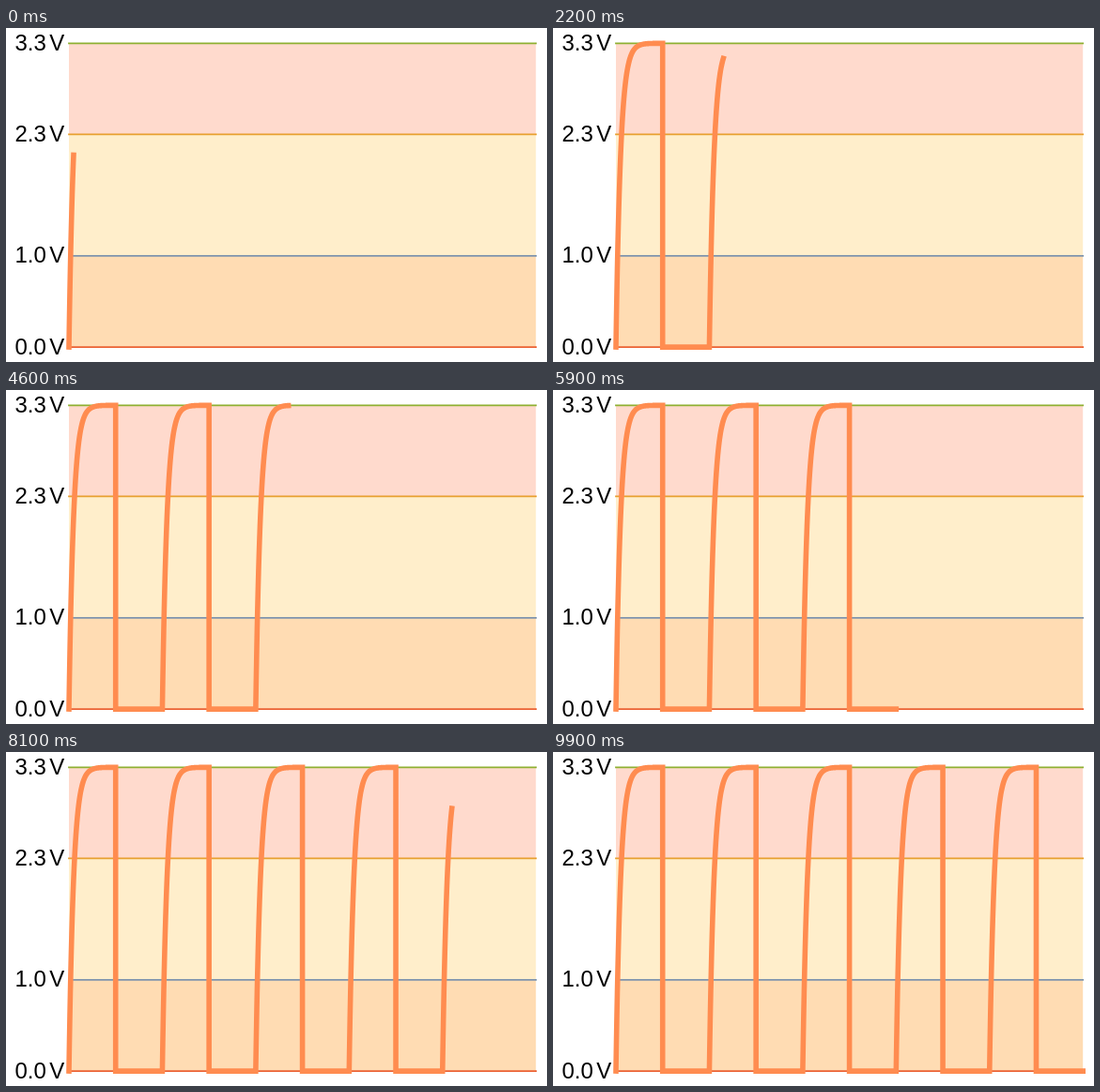
An HTML page with a canvas that plays this animation: 576 by 356 pixels, repeating every 10 s.

```html
<!DOCTYPE html>
<html lang="en">
<head>
<meta charset="utf-8">
<title>Charging pulses</title>
<style>
html, body { margin: 0; width: 576px; height: 356px; overflow: hidden; background: #fff; }
canvas { display: block; }
</style>
</head>
<body>
<canvas id="stage" width="576" height="356"></canvas>
<script>
const ctx = document.getElementById('stage').getContext('2d');
const LEFT = 67, RIGHT = 564.2, BOTTOM = 340.1, HEIGHT = 323.8;
const STEP_MS = 100, STEPS = 100, HALF = 10;

// time in time constants, level as a fraction of the supply voltage
const px = t => LEFT + (RIGHT - LEFT) * t / STEPS;
const py = v => BOTTOM - HEIGHT * v;

const levels = [
  { v: 0, label: '0.0', color: '#eb6235', fill: '#ffdcb3' },
  { v: 0.3, label: '1.0', color: '#7f95ae', fill: '#ffeecb' },
  { v: 0.7, label: '2.3', color: '#e8a030', fill: '#ffdacd' },
  { v: 1, label: '3.3', color: '#8fb032' }
];

function drawBackdrop() {
  ctx.fillStyle = '#fff';
  ctx.fillRect(0, 0, 576, 356);
  levels.forEach((l, i) => {
    if (!l.fill) return;
    const top = py(levels[i + 1].v);
    ctx.fillStyle = l.fill;
    ctx.fillRect(LEFT, top, RIGHT - LEFT, py(l.v) - top);
  });
  ctx.font = '24px "Liberation Sans", Arial, sans-serif';
  ctx.lineWidth = 1.8;
  ctx.lineCap = 'square';
  for (const l of levels) {
    const y = py(l.v);
    ctx.strokeStyle = l.color;
    ctx.beginPath();
    ctx.moveTo(LEFT, y);
    ctx.lineTo(RIGHT, y);
    ctx.stroke();
    ctx.fillStyle = '#000';
    ctx.fillText(l.label, 9.5, y + 7.4);
    ctx.fillText('V', 46.3, y + 7.4);
  }
}

function drawSignal(end) {
  ctx.beginPath();
  ctx.moveTo(px(0), py(0));
  for (let start = 0; start < end; start += 2 * HALF) {
    const peak = Math.min(end, start + HALF);
    for (let t = start; t <= peak + 1e-6; t += 0.1) {
      ctx.lineTo(px(t), py(1 - Math.exp(start - t)));
    }
    if (end > peak) {
      ctx.lineTo(px(peak), py(0));
      ctx.lineTo(px(Math.min(end, peak + HALF)), py(0));
    }
  }
  ctx.strokeStyle = '#ff8c50';
  ctx.lineWidth = 5.6;
  ctx.lineCap = 'square';
  ctx.lineJoin = 'miter';
  ctx.stroke();
}

function frame(now) {
  const step = Math.floor(now / STEP_MS) % STEPS;
  drawBackdrop();
  drawSignal(step + 1);
  requestAnimationFrame(frame);
}

frame(performance.now());
</script>
</body>
</html>
```
